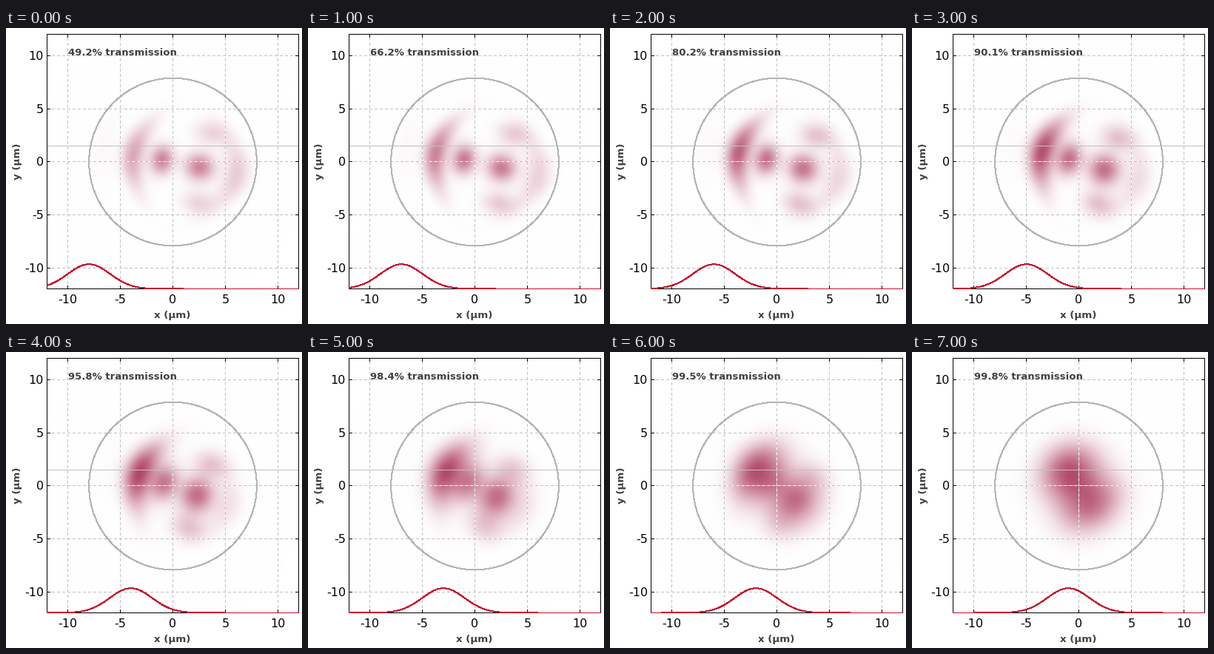
These frames come from a looping animation (400x400 px, 8 s). A matplotlib script:

```python
import numpy as np
import matplotlib.pyplot as plt
from matplotlib.animation import FuncAnimation
from matplotlib.patches import Circle

DPI = 100
PT = 72 / DPI                      # points per pixel
FRAMES = 8
LEFT, RIGHT, TOP, BOTTOM = 55, 395, 8, 352
X0, Y0 = 225.5, 181                # pixel position of the fibre axis
SX, SY = 340 / 24, 344 / 24        # pixels per micrometre
BEAM_Y, BEAM_W = 1.5, 4.0
GREY, INK, RED = "#c0c0c0", "#404040", "#c8102e"
PEAK = np.array([154, 16, 58]) / 255
PERCENT = [49.2, 66.2, 80.2, 90.1, 95.8, 98.4, 99.5, 99.8]

GX, GY = np.meshgrid((np.arange(LEFT + 1, RIGHT) + .5 - X0) / SX,
                     (Y0 - np.arange(TOP + 1, BOTTOM) - .5) / SY)


def launch_x(k):
    return k - 8


def lobe(u, v, at, along, across, power, bend=0):
    """Gaussian spot on the launch axis, bent into an arc if asked."""
    return power * np.exp(-((u - at - bend * v**2) / along)**2 / 2
                          - (v / across)**2 / 2)


def beam(k):
    """Colours of the output beam; it is symmetric about the launch axis."""
    x = launch_x(k)
    d = np.hypot(x, BEAM_Y)
    u = (GX * x + GY * BEAM_Y) / d
    v = (GX * BEAM_Y - GY * x) / d
    t = k / (FRAMES - 1)
    e = t**2.5                     # lobes merge late in the scan
    s = np.sin(np.pi * t)          # strength peaks halfway

    power = (
        lobe(u, v, 3.85 - 1.75 * e, .75 + .75 * e, 2.15 - .15 * e,
             .36 + .25 * e + .35 * s, bend=-.09 + .07 * e)
        + lobe(u, v, 1.05 - .75 * e, .77 + .4 * e, .95 + .95 * e,
               .5 - .28 * e + .12 * s)
        + lobe(u, v, -2.6 + .6 * e, .98 + .62 * e, .9 + 1.15 * e,
               .5 + .1 * e + .08 * s)
        + lobe(u, abs(v) - 3.35 + .75 * e, -3.1 + 1.5 * e, 1.1 + .2 * e,
               .8 + .3 * e, .17 - .14 * e + .1 * s)
        + lobe(u, v, -6.2 + 2.4 * e, .85 + .15 * e, 2.2, .21 - .19 * e - .05 * s,
               bend=.12 - .04 * e)
        + lobe(u, v, 6.8, .8, 2.5, .03 * (1 - t), bend=-.05)
    )
    return 1 - np.clip(power, 0, 1)[..., None] * (1 - PEAK)


def profile(k):
    x = np.linspace(-12, 12, 49)
    y = 33.5 * np.exp(-2 * ((x - launch_x(k)) / BEAM_W)**2)
    return X0 + x * SX, BOTTOM + .5 - y


fig = plt.figure(figsize=(4, 4), dpi=DPI, facecolor="white")
ax = fig.add_axes([0, 0, 1, 1])
ax.set_xlim(0, 400)
ax.set_ylim(400, 0)
ax.axis("off")


def line(xs, ys, color, **kw):
    return ax.plot(xs, ys, color=color, lw=PT, solid_capstyle="butt",
                   dash_capstyle="butt", antialiased=False, **kw)[0]


def label(x, y, text, size, color="black", **kw):
    return ax.text(x, y, text, fontsize=size * PT, color=color,
                   family="DejaVu Sans", **kw)


def grid_line(xs, ys):
    """Grey dashes with white gaps, seen where they cross the beam."""
    line(xs, ys, "white", zorder=2)
    line(xs, ys, GREY, ls=(0, (3, 3)), zorder=2.5)


image = ax.imshow(beam(0), extent=(LEFT + 1, RIGHT, BOTTOM, TOP + 1),
                  aspect="auto", interpolation="nearest", zorder=1)

for n in range(-10, 11, 5):
    px = round(225 + n * SX)
    py = round(180.45 - n * SY)
    grid_line([px, px], [BOTTOM, TOP])
    grid_line([LEFT, RIGHT], [py, py])
    for edge, inward in ((TOP, 4), (BOTTOM, -4)):
        line([px, px], [edge, edge + inward], "black", zorder=4)
    for edge, inward in ((LEFT, 4), (RIGHT, -4)):
        line([edge, edge + inward], [py, py], "black", zorder=4)
    label(px + .5, 372, str(n), 16, ha="center", va="baseline")
    label(51, py + 6, str(n), 16, ha="right", va="baseline")

line([LEFT, RIGHT], [159, 159], GREY, zorder=3)
ax.add_patch(Circle((X0, Y0), 8 * SX, fill=False, ec="#b4b4b4", lw=PT,
                    antialiased=False, zorder=3))
line([LEFT, RIGHT, RIGHT, LEFT, LEFT], [TOP, TOP, BOTTOM, BOTTOM, TOP],
     "black", zorder=4)

label(225, 392, "x (μm)", 13.4, INK, weight="bold", ha="center", va="baseline")
label(15, 180, "y (μm)", 13.4, INK, weight="bold", rotation=90,
      ha="center", va="center")
caption = label(84, 37, "", 13.25, INK, weight="bold", va="baseline", zorder=5)
curve = line([], [], RED, zorder=5)


def update(k):
    image.set_data(beam(k))
    curve.set_data(*profile(k))
    caption.set_text(f"{PERCENT[k]:.1f}% transmission")
    return image, curve, caption


anim = FuncAnimation(fig, update, frames=FRAMES, interval=1000, repeat=True,
                     repeat_delay=0, blit=False)
plt.show()
```
